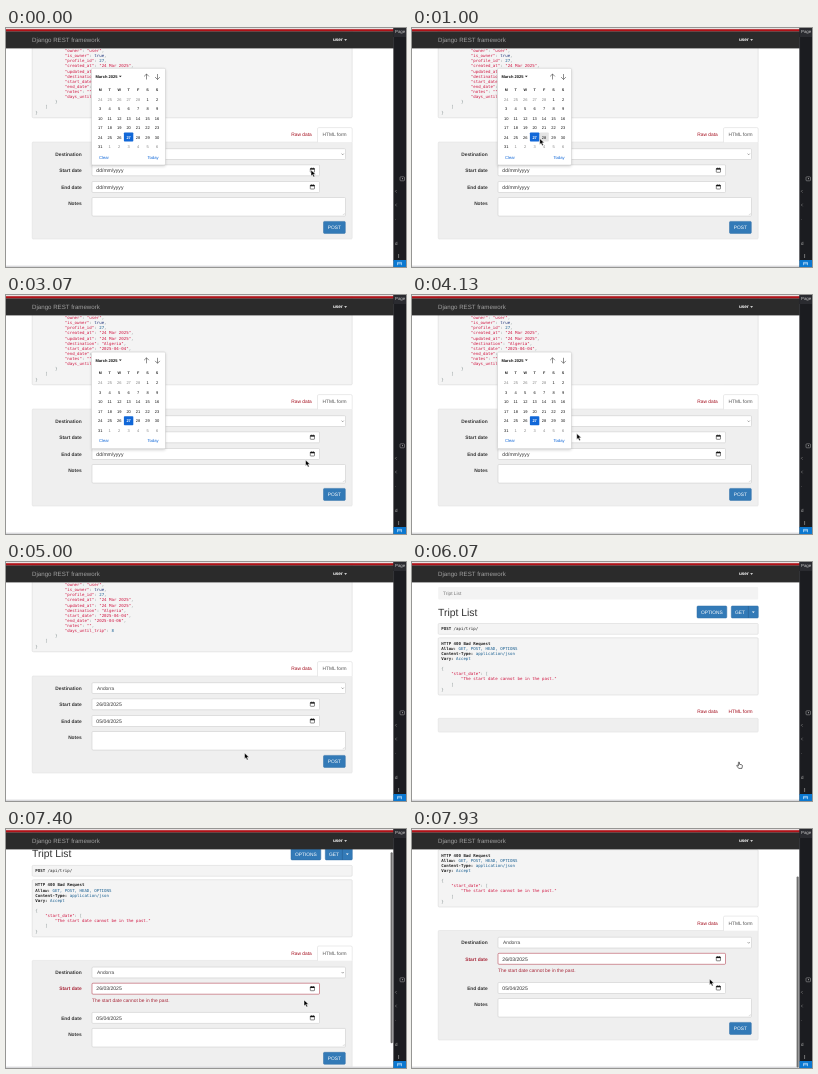
Animation, 400 px wide and 239 px high, one loop 8000 ms. Source, as an HTML page:

```html
<!DOCTYPE html>
<html lang="en">
<head>
<meta charset="utf-8">
<title>Trip form validation</title>
<style>
  html, body { margin: 0; width: 100%; height: 100%; overflow: hidden; background: #fff; }
  svg { display: block; width: 100vw; height: 100vh; }
  text { font-family: "Liberation Sans", Arial, sans-serif; text-rendering: geometricPrecision; white-space: pre; }
  .mono { font-family: "DejaVu Sans Mono", monospace; }
</style>
</head>
<body>
<svg id="stage" viewBox="0 0 400 239" xmlns="http://www.w3.org/2000/svg"></svg>
<script>
const LOOP = 8000;
const RED = '#a30d1c', ERR = '#a8283a', INK = '#333', BLUE = '#337ab7', LINK = '#1067d8';
const stage = document.getElementById('stage');

// Markup helpers
const rect = (x, y, w, h, fill, stroke = 'none', r = 0, extra = '') =>
  `<rect x="${x}" y="${y}" width="${w}" height="${h}" rx="${r}" fill="${fill}" stroke="${stroke}" stroke-width=".5" ${extra}/>`;
const text = (x, y, s, size = 4.85, fill = INK, extra = '') =>
  `<text x="${x}" y="${y}" font-size="${size}" fill="${fill}" ${extra}>${s}</text>`;
const path = (d, stroke, width = .5, fill = 'none') =>
  `<path d="${d}" fill="${fill}" stroke="${stroke}" stroke-width="${width}"/>`;
const caret = (x, y, fill) => path(`M${x - 1.4} ${y}h2.8l-1.4 1.5z`, 'none', 0, fill);
const group = (id, body) => `<g id="${id}">${body}</g>`;
const BOLD = 'font-weight="bold"', MID = 'text-anchor="middle"', END = 'text-anchor="end"';

const mono = (y, s) => text(29.3, y, s, 4.09, '#222', 'class="mono"');
const span = (s, fill) => `<tspan fill="${fill}">${s}</tspan>`;
const strong = s => `<tspan font-weight="bold">${s}</tspan>`;
const json = s => s.replace(/"[^"]*"|true|\d+|[{}[\],:]+/g, m =>
  span(m, m[0] === '"' ? '#d01440' : m === 'true' ? '#1e347b' : /\d/.exec(m) ? '#195f91' : '#7f8c8c'));
const block = (y, lines) => lines.map((s, i) => mono(y + i * 5.125, s)).join('');
const panel = (y, h) => rect(26.2, y, 320, h, '#f4f4f4', '#d3d3d3', 1);

function button(x, y, w, label) {
  return rect(x, y, w, 12, BLUE, '#2e6da4', 1) + text(x + w / 2, y + 7.8, label, 4.85, '#fff', MID);
}

function dateField(y, id, value, bad) {
  return rect(86, y - 5.5, 227.5, 11, '#fff', bad ? ERR : '#c4c4c4', 1) +
    text(90.3, y + 1.8, value, 5.1, INK, `id="${id}"`) +
    rect(304.3, y - 1.9, 4.2, 3.9, 'none', '#111', .5) + rect(304.2, y - 2, 4.4, 1.3, '#111') +
    path(`M305.4 ${y - 2.6}v1M307.4 ${y - 2.6}v1`, '#111', .6);
}

// Form panel; y is its top edge
function form(y, key, start, end, bad) {
  const gap = bad ? 12.5 : 0;
  const label = (dy, s, fill) => text(75.6, y + dy + 1.7, s, 4.85, fill, BOLD + ' ' + END);
  const ny = y + 55.5 + gap, by = y + 79.4 + gap;
  return rect(26.2, y, 320, 97 + gap, '#efefef', '#dcdcdc', 1) +
    path(`M311.5 ${y + .3}v-13.3q0 -1.4 1.4 -1.4h31.9q1.4 0 1.4 1.4v13.3`, '#d5d5d5', .5, '#fff') +
    text(285.3, y - 5.8, 'Raw data', 4.85, RED) + text(316.5, y - 5.8, 'HTML form', 4.85, '#555') +
    label(12, 'Destination') + label(28.3, 'Start date', bad ? ERR : INK) +
    label(45 + gap, 'End date') + label(61.5 + gap, 'Notes') +
    rect(86, y + 6.7, 253.5, 10.8, '#fff', '#c4c4c4', 1) + text(91, y + 13.9, 'Andorra', 4.85, '#444') +
    path(`M335.6 ${y + 11.6}l1.1 1.2l1.1 -1.2`, '#555') +
    dateField(y + 28.3, key + 'Start', start, bad) +
    (bad ? text(86, y + 41.5, 'The start date cannot be in the past.', 4.85, ERR) : '') +
    dateField(y + 45 + gap, key + 'End', end) +
    rect(86, ny, 253.5, 18.6, '#fff', '#c4c4c4', 1) +
    path(`M336.8 ${ny + 17.6}l1.8 -1.8M338 ${ny + 17.6}l.6 -.6`, '#999', .3) +
    rect(317.5, by, 21.8, 12, BLUE, '#2e6da4', 1, `id="${key}Post"`) +
    text(328.4, by + 7.7, 'POST', 4.85, '#fff', MID);
}

function calendar() {
  const col = i => 94.2 + i * 9.47;
  let s = rect(85.5, 41, 74, 97.5, '#000', 'none', 1.5, 'opacity=".16" filter="url(#soft)"') +
    rect(85.5, 40.3, 74, 96.7, '#fff', '#c9c9c9', 1.2) +
    text(89.5, 50, 'March 2025', 4.05, '#111', BOLD) + caret(114.3, 47.8, '#222') +
    path('M140.5 51.5v-5.5m-2.4 2.4l2.4 -2.4l2.4 2.4M151.5 46v5.5m-2.4 -2.4l2.4 2.4l2.4 -2.4', '#333', .55) +
    rect(0, 0, 9.4, 9, '#e4e4e4', 'none', .8, 'id="hover"') +
    rect(117.9, 104.4, 9.4, 9.1, LINK, 'none', .8);
  [...'MTWTFSS'].forEach((d, i) => s += text(col(i), 62.6, d, 3.7, '#222', BOLD + ' ' + MID));
  for (let i = 0; i < 42; i++) {
    const n = i - 4, inside = n > 0 && n < 32;
    const day = n < 1 ? n + 28 : inside ? n : n - 31;
    s += text(col(i % 7), 72.5 + 9.5 * Math.floor(i / 7), day, 4,
      n === 27 ? '#fff' : inside ? '#111' : '#858585', MID + (n === 27 ? ' ' + BOLD : ''));
  }
  return s + text(98, 130.6, 'Clear', 4.2, LINK, MID) + text(147, 130.6, 'Today', 4.2, LINK, MID);
}

const firstPage = panel(-20, 109.8) + block(24, [
  '            "owner": "user",', '            "is_owner": true,', '            "profile_id": 27,',
  '            "created_at": "24 Mar 2025",', '            "updated_at": "24 Mar 2025",',
  '            "destination": "Algeria",', '            "start_date": "2025-04-04",',
  '            "end_date": "2025-04-06",', '            "notes": "",', '            "days_until_trip": 8',
  '        }', '    ]', '}'].map(json)) + form(114, 'a', 'dd/mm/yyyy', 'dd/mm/yyyy');

const header = (k, v) => strong(k + ':') + ' ' + span(v, '#195f91');
const replyPage = rect(26.2, 25, 320, 12.5, '#f3f3f3', 'none', 1) + text(31, 33, 'Tript List', 4.85, '#777') +
  text(26, 53.6, 'Tript List', 10.4, INK) +
  button(285, 44, 29.8, 'OPTIONS') + button(319.3, 44, 27, '') + text(328, 51.8, 'GET', 4.85, '#fff', MID) +
  path('M336.4 44v12', '#25598a') + caret(341.3, 49.5, '#fff') +
  panel(61.5, 10.8) + mono(68.3, strong('POST') + ' /api/trip/') +
  panel(75.8, 57.2) + block(82.6, [
    strong('HTTP 400 Bad Request'), header('Allow', 'GET, POST, HEAD, OPTIONS'),
    header('Content-Type', 'application/json'), header('Vary', 'Accept'), '',
    json('{'), json('    "start_date": ['), json('        "The start date cannot be in the past."'),
    json('    ]'), json('}')]) +
  group('bare', rect(26.2, 156.3, 320, 13.8, '#efefef', '#dcdcdc', 1) +
    text(285.3, 151, 'Raw data', 4.85, RED) + text(316.5, 151, 'HTML form', 4.85, RED)) +
  group('full', form(156.5, 'b', '26/03/2025', '05/04/2025', true));

const navbar = rect(0, 0, 388, 1.3, '#e9e2e2') + rect(0, 1.2, 388, 2.4, '#b01218') +
  rect(0, 3.4, 388, 17, '#2b2b2b') + text(26, 13.5, 'Django REST framework', 6.15, '#a0a0a0') +
  text(336.8, 13.4, 'user', 4.7, '#fff', BOLD + ' ' + END) + caret(339.6, 11.2, '#fff');

const editor = rect(387.5, 0, 12.5, 239, '#1b1c20') + rect(387.5, 0, 12.5, 9, '#2a2b30') +
  text(389, 5.2, 'Page', 4.4, '#c8c8c8') + path('M387.6 9v224', '#4a4a4e', .5) +
  rect(394, 148.8, 4.5, 4, 'none', '#aaa', .8) + path('M396 150.7h1', '#ccc', .8) +
  path('M390.6 162l-1.3 1.3l1.3 1.3M390.6 175.7l-1.3 1.3l1.3 1.3', '#999') +
  text(389, 192, '.', 5, '#999') + text(389, 217, 'd', 4.5, '#aaa') + path('M392.6 226v4', '#999', .7) +
  rect(387.5, 232, 12.5, 7, '#0b78d0') + path('M391.5 237.2v-2.8h4v2.8m-4 -1.4h4', '#d8ecff', .6);

stage.innerHTML = `<defs><filter id="soft" x="-20%" y="-20%" width="140%" height="140%"><feGaussianBlur stdDeviation="1.8"/></filter></defs>` +
  rect(0, 0, 400, 239, '#fff') + group('first', firstPage) + group('reply', replyPage) + navbar +
  rect(0, 237.6, 388, 1.4, '#d9d9dc') + rect(384.6, 0, 2.1, 191, '#6f6f6f', 'none', 1, 'id="thumb"') + editor +
  group('popup', calendar()) +
  group('arrow', '<path d="M0 0v6l1.4 -1.3l1.1 2.4l1.2 -.6l-1.1 -2.3h2z" fill="#000" stroke="#fff" stroke-width=".5"/>') +
  group('beam', path('M-1.2 -2.7q1.2 0 1.2 .8q0 -.8 1.2 -.8M0 -2v4M-1.2 2.7q1.2 0 1.2 -.8q0 .8 1.2 .8', '#222', .7)) +
  group('hand', '<path d="M-.6 -1.7q.6 -.6 1.1 0v2l2.2 .5q.9 .3 .7 1.4l-.5 2.2h-3.2l-2 -2.6q0 -.9 .9 -.5l.8 .6z" fill="#fff" stroke="#111" stroke-width=".6"/>');

const el = {};
stage.querySelectorAll('[id]').forEach(e => el[e.id] = e);
const show = (e, on) => e.setAttribute('display', on ? 'inline' : 'none');
const move = (e, x, y) => e.setAttribute('transform', `translate(${x} ${y})`);

// Keys are [time, ...values]
const pointer = [
  [0, 305, 142], [370, 305, 142], [1130, 113, 108], [1300, 113, 108], [1870, 281.5, 178.5],
  [2130, 304, 156], [2200, 304, 156], [2600, 304.5, 157], [2800, 304.5, 157], [3070, 299.5, 165],
  [3270, 299, 165.5], [3500, 299, 165.5], [4330, 142, 134], [4400, 142, 134], [4730, 219, 192],
  [4940, 219, 192], [5000, 238.5, 191], [5780, 327, 202], [6640, 327, 202], [7230, 298, 171],
  [7400, 298, 171], [7860, 297.5, 150], [LOOP, 297.5, 150]];
const scroll = [[0, 0], [7130, 0], [7270, 8], [7400, 25], [7600, 44], [7780, 53], [7930, 55], [LOOP, 55]];

function sample(keys, t, ease) {
  const i = keys.findIndex(k => k[0] > t), a = keys[i - 1], b = keys[i];
  const u = ease((t - a[0]) / (b[0] - a[0]));
  return a.slice(1).map((v, n) => v + (b[n + 1] - v) * u);
}

function draw(t) {
  const [x, y] = sample(pointer, t, u => u * u * (3 - 2 * u));
  const [top] = sample(scroll, t, u => u);
  const sent = t >= 5870, loaded = t >= 6130;

  show(el.first, !sent);
  show(el.reply, sent);
  show(el.bare, !loaded);
  show(el.full, loaded);
  move(el.reply, 0, -top);
  el.aStart.textContent = t < 1330 ? 'dd/mm/yyyy' : '26/03/2025';
  el.aEnd.textContent = t < 4400 ? 'dd/mm/yyyy' : '05/04/2025';

  const drop = t < 1330 ? 0 : 16.8;
  show(el.popup, t < 1330 || (t >= 2800 && t < 4400));
  move(el.popup, 0, drop);
  const c = Math.round((x - 94.2) / 9.47), r = Math.round((y - drop - 71) / 9.5);
  show(el.hover, c >= 0 && c < 7 && r >= 0 && r < 6);
  move(el.hover, 89.5 + c * 9.47, 66.5 + r * 9.5);

  show(el.thumb, t >= 7130);
  move(el.thumb, 0, 3 + top * .81);

  const onPost = !loaded && x > 317 && y > 193;
  const onNotes = !sent && !onPost && x > 86 && x < 339 && y > 170 && y < 188;
  el.aPost.setAttribute('fill', onPost ? '#286090' : BLUE);
  for (const [e, on] of [[el.hand, onPost], [el.beam, onNotes], [el.arrow, !onPost && !onNotes]]) {
    show(e, on);
    move(e, x, y);
  }
}

const begin = performance.now();
function tick() {
  draw((performance.now() - begin) % LOOP);
  requestAnimationFrame(tick);
}
tick();
</script>
</body>
</html>
```
